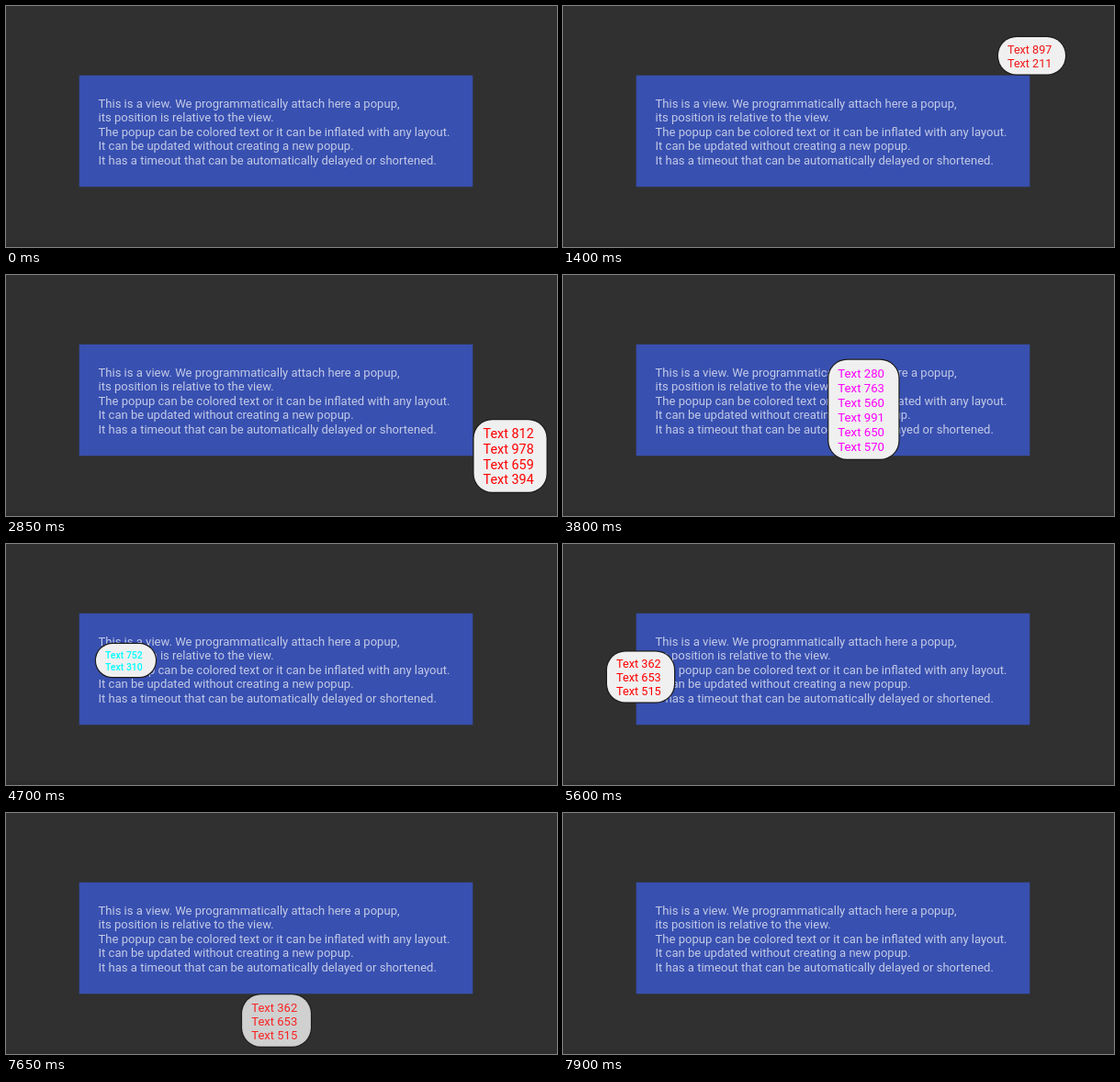
An HTML page with a canvas that plays this animation: 600x263 px, repeating every 9150 ms.

```html
<!DOCTYPE html>
<html lang="en">
<head>
<meta charset="utf-8">
<title>Popup demo</title>
<style>
html, body { margin: 0; width: 100%; height: 100%; overflow: hidden; background: #303030; }
canvas { display: block; width: 600px; height: 263px; }
</style>
</head>
<body>
<canvas id="stage"></canvas>
<script>
const W = 600, H = 263, LOOP = 9150, STEP = 50, MOVE = 400, FADE = 300;
const SHOW = 1150, HIDE = 7650;
const canvas = document.getElementById('stage');
const ctx = canvas.getContext('2d');
const ratio = window.devicePixelRatio || 1;
canvas.width = W * ratio;
canvas.height = H * ratio;

const intro = [
  'This is a view. We programmatically attach here a popup,',
  'its position is relative to the view.',
  'The popup can be colored text or it can be inflated with any layout.',
  'It can be updated without creating a new popup.',
  'It has a timeout that can be automatically delayed or shortened.'
];

// at: content swap, go: start of the slide from the previous place
const popups = [
  { at: 1150, go: 1150, x: 474, y: 34, w: 73, h: 40.5, size: 12.6, pitch: 14.6, color: '#f01414', nums: [897, 211] },
  { at: 2550, go: 2555, x: 509.6, y: 158.4, w: 79, h: 78.6, size: 14.4, pitch: 16.7, color: '#ff0000', nums: [812, 978, 659, 394] },
  { at: 3650, go: 3668, x: 255, y: 82.5, w: 76, h: 108, size: 13.2, pitch: 16, color: '#ff00ff', nums: [280, 763, 560, 991, 650, 570] },
  { at: 4600, go: 4601, x: 48, y: 117.5, w: 65, h: 36, size: 10.5, pitch: 12.3, color: '#00ffff', weight: 500, nums: [752, 310] },
  { at: 5600, go: 5610, x: 258, y: 199, w: 73, h: 55, size: 12.7, pitch: 14.8, color: '#ff0000', nums: [362, 653, 515] }
];

const clamp = v => Math.min(1, Math.max(0, v));
const decelerate = u => 1 - Math.pow(1 - clamp(u), 5);
const mix = (a, b, p) => a + (b - a) * p;

function setFont(size, color, weight = 400) {
  ctx.font = `${weight} ${size}px Roboto, sans-serif`;
  ctx.fillStyle = color;
}

function drawView() {
  ctx.fillStyle = '#303030';
  ctx.fillRect(0, 0, W, H);
  ctx.fillStyle = '#2d2d2d';
  ctx.fillRect(0, 259, W, 4);
  ctx.fillStyle = '#3850b0';
  ctx.fillRect(79.7, 75.7, 428.6, 121.6);
  setFont(13.05, '#c3cae7');
  intro.forEach((line, i) => ctx.fillText(line, 100.5, 110.8 + i * 15.5));
}

function drawPopup(p, x, y, shown) {
  const scale = 1 + 0.15 * (1 - shown);
  ctx.save();
  ctx.globalAlpha = shown;
  ctx.translate(x + p.w / 2, y + p.h / 2);
  ctx.scale(scale, scale);
  ctx.translate(-p.w / 2, -p.h / 2);
  ctx.beginPath();
  ctx.roundRect(0, 0, p.w, p.h, Math.min(20, p.h / 2));
  ctx.strokeStyle = '#1c1c1c';
  ctx.lineWidth = 2.4;
  ctx.stroke();
  ctx.fillStyle = '#f0f0f0';
  ctx.fill();
  setFont(p.size, p.color, p.weight);
  const top = (p.h - (p.nums.length - 1) * p.pitch) / 2 + p.size * 0.355 + 0.6;
  p.nums.forEach((n, i) => ctx.fillText('Text ' + n, 10, top + i * p.pitch));
  ctx.restore();
}

function render(time) {
  const t = Math.floor((time % LOOP) / STEP) * STEP;
  ctx.setTransform(ratio, 0, 0, ratio, 0, 0);
  drawView();
  const shown = t < HIDE
    ? clamp((t - SHOW + STEP) / FADE)
    : clamp(1 - (t - HIDE + STEP) / FADE);
  if (t < SHOW || shown <= 0) return;
  const i = popups.findLastIndex(p => t >= p.at);
  const p = popups[i], from = popups[i - 1] || p;
  const k = decelerate((t - p.go) / MOVE);
  drawPopup(p, mix(from.x, p.x, k), mix(from.y, p.y, k), shown);
}

const start = performance.now();
function tick() {
  render(performance.now() - start);
  requestAnimationFrame(tick);
}
tick();
</script>
</body>
</html>
```
